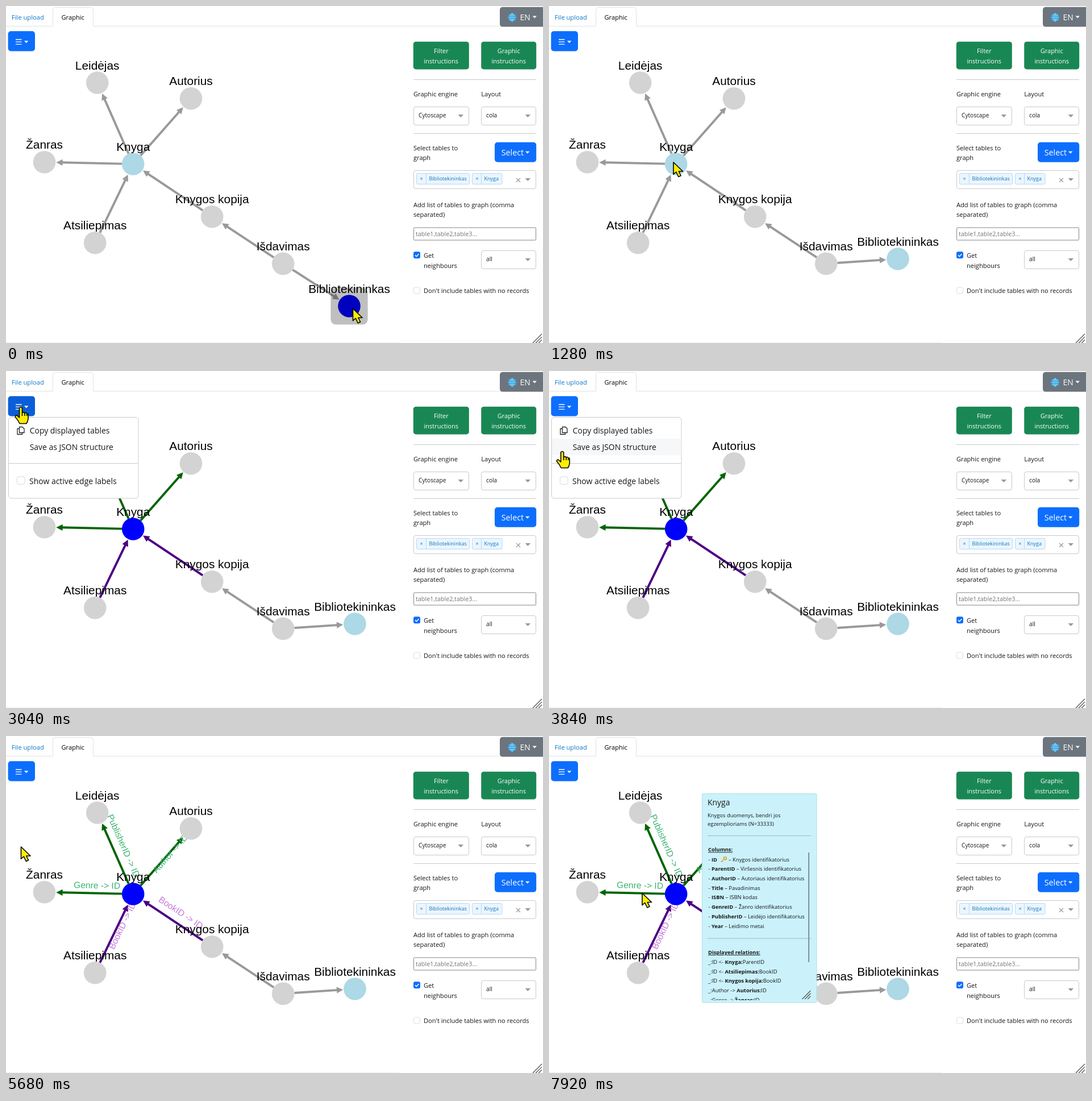
Recreate the animation shown at these times as an HTML page. Size 945 px wide and 593 px high, loop 8000 ms.

```html
<!DOCTYPE html>
<html lang="en">
<head>
<meta charset="utf-8">
<title>Table graph</title>
<style>
html, body { margin: 0; width: 100%; height: 100%; overflow: hidden; background: #fff; }
svg { display: block; width: 945px; height: 593px; }
text { font-family: "Open Sans", "Noto Sans", sans-serif; fill: #14171a; white-space: pre; }
.graph text { font-family: "Liberation Sans", Arial, sans-serif; fill: #000; text-anchor: middle; }
</style>
</head>
<body>
<svg id="stage" viewBox="0 0 945 593"></svg>
<script>
const LOOP = 8000, STEP = 80, R = 19.8;
const stage = document.getElementById('stage');

function el(tag, attrs = {}, parent = stage) {
  const e = document.createElementNS('http://www.w3.org/2000/svg', tag);
  set(e, attrs);
  parent.appendChild(e);
  return e;
}
function set(e, attrs) {
  for (const k in attrs) e.setAttribute(k, attrs[k]);
}
function show(e, on) {
  e.setAttribute('display', on ? 'inline' : 'none');
}
function text(x, y, str, size, attrs = {}, parent = stage) {
  const e = el('text', { x, y, 'font-size': size, ...attrs }, parent);
  // *...* marks bold runs
  str.split('*').forEach((part, i) => {
    if (part) el('tspan', i % 2 ? { 'font-weight': 700 } : {}, e).textContent = part;
  });
  return e;
}
function box(x, y, width, height, fill, attrs = {}, parent = stage) {
  return el('rect', { x, y, width, height, fill, ...attrs }, parent);
}
function line(d, stroke, width = 1, parent = stage) {
  return el('path', { d, stroke, 'stroke-width': width, fill: 'none' }, parent);
}
function caret(x, y, w, h, fill) {
  el('path', { d: `M${x} ${y}h${w}l${-w / 2} ${h}z`, fill });
}
function grip(x, y, size, parent = stage) {
  let d = '';
  for (const k of [1, 0.68, 0.36]) d += `M${x - size * k} ${y}L${x} ${y - size * k}`;
  line(d, '#555', 1.3, parent);
}

/* ---- graph ---- */
const graph = el('g', { class: 'graph' });
const nodes = {
  leidejas: { x: 160.7, y: 135, name: 'Leidėjas' },
  autorius: { x: 325.5, y: 162.7, name: 'Autorius' },
  zanras: { x: 67.5, y: 274.7, name: 'Žanras' },
  knyga: { x: 223.7, y: 278, name: 'Knyga', fill: '#add8e6' },
  atsil: { x: 156.7, y: 416.7, name: 'Atsiliepimas' },
  kopija: { x: 362.7, y: 370.7, name: 'Knygos kopija' },
  isdav: { x: 487.7, y: 453.4, name: 'Išdavimas' },
  bibl: { x: 614, y: 445, name: 'Bibliotekininkas', fill: '#add8e6' }
};
const OUT = ['#006400', '#3cb371'], IN = ['#4b0082', '#c57ada'];
const edges = [
  ['knyga', 'leidejas', OUT, 'PublisherID -> ID'],
  ['knyga', 'autorius', OUT, 'Author -> ID'],
  ['knyga', 'zanras', OUT, 'Genre -> ID'],
  ['atsil', 'knyga', IN, 'BookID -> ID'],
  ['kopija', 'knyga', IN, 'BookID -> ID'],
  ['isdav', 'kopija'],
  ['isdav', 'bibl']
].map(([a, b, tone, label]) => {
  const e = { a: nodes[a], b: nodes[b], tone };
  e.line = line('', '#999', 3.9, graph);
  e.head = el('path', { fill: '#999' }, graph);
  if (label) {
    const { a: p, b: q } = e;
    const deg = Math.atan((q.y - p.y) / (q.x - p.x)) * 180 / Math.PI;
    const at = `translate(${(p.x + q.x) / 2 + 14.5} ${(p.y + q.y) / 2 - 13.4}) rotate(${deg})`;
    e.label = text(0, 5.2, label, 15.6, { transform: at, style: `fill:${tone[1]}` }, graph);
  }
  return e;
});
for (const n of Object.values(nodes)) {
  n.g = el('g', {}, graph);
  n.disc = el('circle', { r: R }, n.g);
  n.halo = box(-32.6, -32.6, 65.2, 65.2, '#000', { rx: 9, 'fill-opacity': 0.25 }, n.g);
  text(0, -23.3, n.name, 20.85, {}, n.g);
}

function drawEdge(e, active) {
  const dx = e.b.x - e.a.x, dy = e.b.y - e.a.y, d = Math.hypot(dx, dy);
  const ux = dx / d, uy = dy / d;
  const at = (o, k, s = 0) => `${o.x + ux * k - uy * s} ${o.y + uy * k + ux * s}`;
  const color = active && e.tone ? e.tone[0] : '#999';
  set(e.line, { d: `M${at(e.a, R)}L${at(e.b, -R - 9)}`, stroke: color });
  set(e.head, { d: `M${at(e.b, -R - 1)}L${at(e.b, -R - 12.3, 5.7)}L${at(e.b, -R - 12.3, -5.7)}z`, fill: color });
}

/* ---- tabs and buttons ---- */
const BLUE = '#0d6efd', RULE = '#c6c8ca', FIELD = '#c9c9c9';
line('M0 35.5H82.5V7.5Q82.5 2.5 87.5 2.5H148.5Q153.5 2.5 153.5 7.5V35.5H945', '#dee2e6');
text(10, 23.5, 'File upload', 11.15, { style: 'fill:#0b78c9' });
text(97.5, 23.5, 'Graphic', 11.15, { style: 'fill:#000' });
box(869, 1.8, 80, 34.8, '#6c757d', { rx: 5 });
el('circle', { cx: 890.7, cy: 20, r: 7.4, fill: '#2f9fe0' });
line('M883.5 20h14.4M885 16h11.4M885 24h11.4M890.7 12.6v14.8M890.7 12.6q-7 7.4 0 14.8q7-7.4 0-14.8', '#a9dcf7', 0.8);
text(904.5, 25, 'EN', 13.9, { style: 'fill:#fff' });
caret(926.5, 17.5, 7.4, 4, '#fff');
const menuButton = box(3.6, 44.3, 47.4, 35.2, BLUE, { rx: 5 });
line('M17 59h10.5M17 63.2h10.5M17 67.4h10.5', '#fff', 1.3);
caret(32, 61.3, 7.4, 4, '#fff');

/* ---- side panel ---- */
function label(x, y, str) { text(x, y, str, 11.1); }
function greenButton(x, w, top) {
  const mid = { 'text-anchor': 'middle', style: 'fill:#fff' };
  box(x, 62.8, w, 48.6, '#198754', { rx: 4.5 });
  text(x + w / 2, 82.8, top, 11, mid);
  text(x + w / 2, 101, 'instructions', 11, mid);
}
function dropdown(x, y, w, str) {
  box(x, y, w, 32, '#fff', { rx: 3.5, stroke: FIELD });
  if (str) text(x + 8.6, y + 18.7, str, 10.1);
  caret(x + w - 19, y + 13.5, 9.6, 5, '#999');
}
function tag(x, w, cut, str) {
  const ink = { style: 'fill:#0b78b8' };
  box(x, 294.5, w, 19, '#ebf5ff', { rx: 2, stroke: '#b5daf3' });
  line(`M${x + cut} 294.5v19`, '#b5daf3');
  text(x + 6, 307.4, '×', 9, ink);
  text(x + cut + 5, 307.4, str, 9, ink);
}
greenButton(716.8, 98, 'Filter');
greenButton(836.2, 97, 'Graphic');
line('M717 129.5H933M717 224.5H933', RULE);
label(717, 158.5, 'Graphic engine');
label(836.3, 158.5, 'Layout');
dropdown(717.5, 177.5, 97, 'Cytoscape');
dropdown(836.5, 177.5, 96, 'cola');
label(717, 253.5, 'Select tables to');
label(717, 271, 'graph');
box(860, 239.8, 73.2, 35, BLUE, { rx: 5 });
text(871.7, 262.7, 'Select', 14.3, { style: 'fill:#fff' });
caret(914, 255.8, 7.4, 4, '#fff');
dropdown(717.5, 289.5, 215);
tag(722.5, 93, 17, 'Bibliotekininkas');
tag(820.5, 52.5, 16, 'Knyga');
line('M898 303l7 7m0-7l-7 7', '#999', 1.2);
label(717, 353.8, 'Add list of tables to graph (comma');
label(717, 371.3, 'separated)');
box(717.5, 390, 215, 22, '#fff', { rx: 1.5, stroke: '#858585' });
text(721, 405.2, 'table1,table2,table3...', 10.8, { style: 'fill:#757575' });
box(717, 432.3, 12, 12, BLUE, { rx: 3 });
line('M720 438.4l2.3 2.3l4.2-4.5', '#fff', 1.5);
label(735, 443, 'Get');
label(735, 461.4, 'neighbours');
dropdown(836.5, 430.5, 96, 'all');
box(717.5, 495, 11, 11, '#fff', { rx: 3, stroke: '#d9dcdf' });
label(735, 504.7, "Don't include tables with no records");
line('M0 592.5H692', '#ececec');
grip(943, 593, 16);

/* ---- menu ---- */
const menu = el('g');
box(4.5, 81.5, 228.5, 142.5, '#fff', { rx: 5, stroke: '#cbcbcb' }, menu);
const hover = box(5, 0, 227.5, 29.3, '#f6f7f8', {}, menu);
line('M23.5 98.5h5.5l3 3v7h-8.5zM23.5 101.5h-3.5v10h8.5v-3', '#212529', 1.3, menu);
text(41.7, 110, 'Copy displayed tables', 13.93, {}, menu);
text(41.7, 139.3, 'Save as JSON structure', 13.93, {}, menu);
line('M5 162.7H232.5', RULE, 1, menu);
const check = box(19.5, 186, 13.5, 13.5, '#fff', { rx: 3.3, stroke: '#d5d9dd' }, menu);
const tick = line('M22.8 193l2.7 2.7l4.7-5.2', '#fff', 1.7, menu);
text(41, 198.7, 'Show active edge labels', 13.97, {}, menu);

/* ---- table details ---- */
const card = el('g');
el('path', { d: 'M270 276l-5.5 9.5l5.5 9.5z', fill: '#f4fbfd' }, card);
box(269.5, 101.5, 201.5, 367.5, '#cbf2fa', { rx: 1.5, stroke: '#b0dde6' }, card);
const clip = el('clipPath', { id: 'card' }, card);
box(270, 102, 200, 363, '#000', {}, clip);
const body = el('g', { 'clip-path': 'url(#card)' }, card);
const under = { 'text-decoration': 'underline' };
text(279, 121.5, 'Knyga', 13.9, {}, body);
text(279, 143.3, 'Knygos duomenys, bendri jos', 9.4, {}, body);
text(279, 157.8, 'egzemplioriams (N=33333)', 9.4, {}, body);
line('M279 175.5H461.5M279 356.2H461.5', '#9dbcc3', 1, body);
text(280, 203.3, '*Columns:*', 9.3, under, body);
text(280, 384, '*Displayed relations:*', 9.3, under, body);
text(316, 220.5, '– Knygos identifikatorius', 9.4, {}, body);
el('circle', { cx: 309.8, cy: 215.3, r: 2.4, fill: 'none', stroke: '#e3a63b', 'stroke-width': 1.9 }, body);
line('M308 217l-5.5 4.5m1.8-1.4l1.4 1.5', '#e3a63b', 1.6, body);
[
  '*ID*',
  '*ParentID* – Viršesnis identifikatorius',
  '*AuthorID* – Autoriaus identifikatorius',
  '*Title* – Pavadinimas',
  '*ISBN* – ISBN kodas',
  '*GenreID* – Žanro identifikatorius',
  '*PublisherID* – Leidėjo identifikatorius',
  '*Year* – Leidimo metai'
].forEach((s, i) => text(280.5, 220.5 + i * 16.72, '- ' + s, 9.4, {}, body));
[
  'ID <- *Knyga:*ParentID',
  'ID <- *Atsiliepimas:*BookID',
  'ID <- *Knygos kopija:*BookID',
  'Author -> *Autorius:*ID',
  'Genre -> *Žanras:*ID'
].forEach((s, i) => text(280, 401 + i * 16.7, '_:' + s, 9.4, {}, body));
line('M457.2 205V398', '#77858a', 1.8, card);
grip(460.5, 463, 15, card);

/* ---- pointer ---- */
const pen = { fill: '#ffee00', stroke: '#000', 'stroke-width': 1.6, 'stroke-linejoin': 'round' };
const pointer = el('g');
const arrow = el('path', { d: 'M.5-.5V20.7L5.3 16.5L9.3 25L13.6 23L9.8 15.5H17z', ...pen }, pointer);
const hand = el('path', {
  d: 'M-2.5 1Q0-2 2.5 1V9.5Q5.5 7.5 7 10Q9.5 8.5 10.7 11Q13 10.5 13 13.5V20Q12.5 25 10 28.5H-2Q-5 22-9.7 17Q-9.5 13-6.5 14.3L-2.5 18zM2.5 9.5V15M7 10V15M10.7 11V15',
  ...pen
}, pointer);

/* ---- timeline ---- */
const PATH = [
  [0, 610, 533], [640, 620, 450], [800, 620, 450], [1200, 218.5, 275.5],
  [1680, 218.5, 275.5], [2240, 98, 101.5], [2640, 26, 64], [3200, 26, 64],
  [3840, 23.3, 142], [4320, 26, 195.5], [5840, 26, 195.5], [6480, 221, 277],
  [7360, 221, 277], [7760, 163.5, 277]
];
const ease = k => k * k * (3 - 2 * k);
function pointerAt(t) {
  const i = PATH.findIndex(p => p[0] > t);
  if (i < 0) return PATH[PATH.length - 1].slice(1);
  const [t0, x0, y0] = PATH[i - 1], [t1, x1, y1] = PATH[i];
  const k = ease((t - t0) / (t1 - t0));
  return [x0 + (x1 - x0) * k, y0 + (y1 - y0) * k];
}

function render(t) {
  const within = (a, b) => t >= a && t < b;
  const [px, py] = pointerAt(t);
  const drag = t < 720, active = t >= 1520, checked = t >= 4720;
  const press = within(1360, 1520) || within(6800, 7120);
  const { knyga, bibl } = nodes;

  bibl.x = drag ? px - 6 : 614;
  bibl.y = drag ? py - 5 : 445;
  for (const n of Object.values(nodes)) {
    const held = n === bibl && drag || n === knyga && press;
    const blue = held || n === knyga && active;
    set(n.g, { transform: `translate(${n.x} ${n.y})` });
    set(n.disc, { fill: blue ? '#00f' : n.fill || '#d3d3d3' });
    show(n.halo, held);
  }
  for (const e of edges) {
    drawEdge(e, active);
    if (e.label) show(e.label, t >= 4800);
  }

  const open = within(2880, 5440);
  const overButton = px < 51 && py > 44 && py < 80;
  set(menuButton, { fill: overButton ? '#0b5ed7' : BLUE });
  show(menu, open);
  set(hover, { y: py < 119 ? 90 : 119 });
  show(hover, py >= 90 && py < 149);
  set(check, { fill: checked ? BLUE : '#fff', stroke: checked ? BLUE : '#d5d9dd' });
  show(tick, checked);
  show(card, t >= 7120);

  const pointing = overButton || open && py > 82;
  set(pointer, { transform: `translate(${px} ${py})` });
  show(hand, pointing);
  show(arrow, !pointing);
}

const start = performance.now();
function frame() {
  const t = (performance.now() - start) % LOOP;
  render(Math.floor(t / STEP) * STEP);
  requestAnimationFrame(frame);
}
frame();
</script>
</body>
</html>
```
